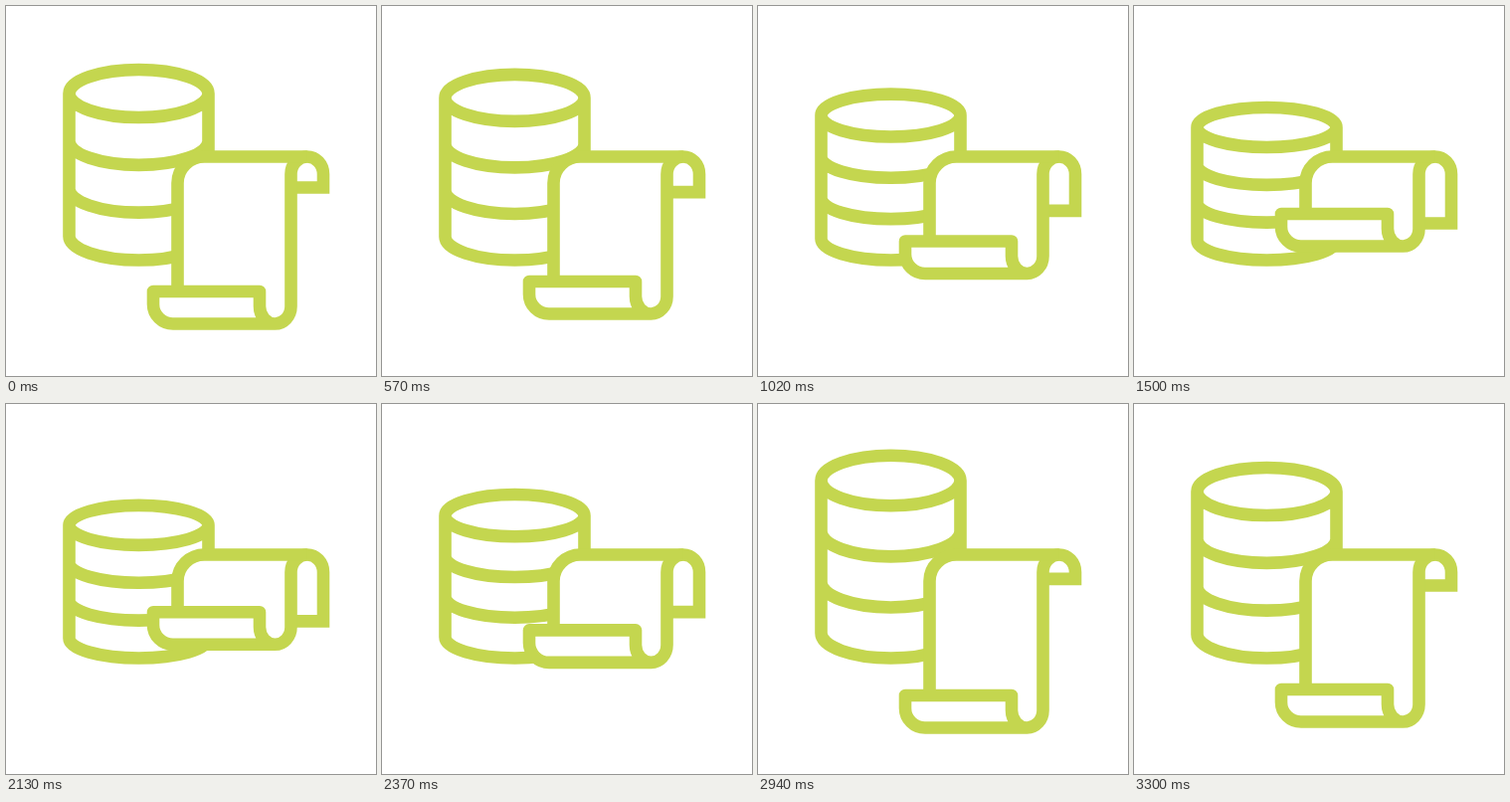
Recreate the animation shown at these times as an HTML page. Size 372 px wide and 372 px high, loop 3.63 s.

```html
<!DOCTYPE html>
<html lang="en">
<head>
<meta charset="utf-8">
<title>Database and scroll</title>
<style>
  html, body { margin: 0; width: 100%; height: 100%; overflow: hidden; background: #fff; }
  svg { display: block; width: 100%; height: 100%; }
  path { fill: none; stroke: #c4d64f; stroke-width: 12.6; stroke-linejoin: round; }
  #sheet { fill: #fff; stroke: none; }
  #curl { stroke-linejoin: miter; }
</style>
</head>
<body>
<svg viewBox="0 0 372 372">
  <path id="drum"/>
  <path id="sheet"/>
  <path id="curl"/>
  <path id="roll"/>
</svg>
<script>
const LOOP = 3630, STEP = 30;
const SHRINK = 300, SHRUNK = 1500, GROW = 2100, PEAK = 3000, REST = 3300;

const ease = (t, a, b) => {
  const u = Math.min(1, Math.max(0, (t - a) / (b - a)));
  return u * u * (3 - 2 * u);
};

// 0 = tall, 1 = compact; growing back overshoots by `over` before settling.
const squash = (t, over) =>
  ease(t, SHRINK, SHRUNK) - (1 + over) * ease(t, GROW, PEAK) + over * ease(t, PEAK, REST);

const setPath = (id, d) => document.getElementById(id).setAttribute("d", d);

function drawDrum(p) {
  const left = 63.5, right = 203.5, floor = 255.5;
  const cy = 88 + 34 * p, ry = 24 - 4 * p;
  const gap = (floor - cy - ry) / 3;
  const arc = (y, sweep) => `M${left} ${y}A70 ${ry} 0 0 ${sweep} ${right} ${y}`;
  let d = arc(cy, 1);
  for (let i = 0; i < 4; i++) d += arc(cy + gap * i, 0);
  d += `M${left} ${cy}V${floor - ry}M${right} ${cy}V${floor - ry}`;
  setPath("drum", d);
}

function drawScroll(p, curlP) {
  const bar = 287 - 78 * p, base = bar + 32.5;
  const tip = 182.5 + 36 * curlP;
  const foot = `V${base - 17.5}A16 17.5 0 0 1 270.5 ${base}`;
  const lip = `H168A20 19.5 0 0 1 148 ${base - 19.5}V${bar}`;
  const top = `M172.5 ${bar}V178A27 26.5 0 0 1 199.5 151.5H302.7`;

  setPath("sheet", `${top}A16.2 17.5 0 0 0 286.5 169${foot}${lip}Z`
    + `M286.5 169A16.2 17.5 0 0 1 319 169V${tip}H286.5Z`);
  setPath("curl", `M286.5 169A16.25 17.5 0 0 1 319 169V${tip}H286.5`);
  setPath("roll", `${top}M286.5 169${foot}${lip}H255V${base - 17.5}A15.5 17.5 0 0 0 270.5 ${base}`);
}

const start = performance.now();
function frame() {
  const elapsed = (performance.now() - start) % LOOP;
  const t = Math.floor(elapsed / STEP) * STEP;
  drawDrum(squash(t, 0.34));
  drawScroll(squash(t, 0.09), squash(t, 0.2));
  requestAnimationFrame(frame);
}
frame();
</script>
</body>
</html>
```
